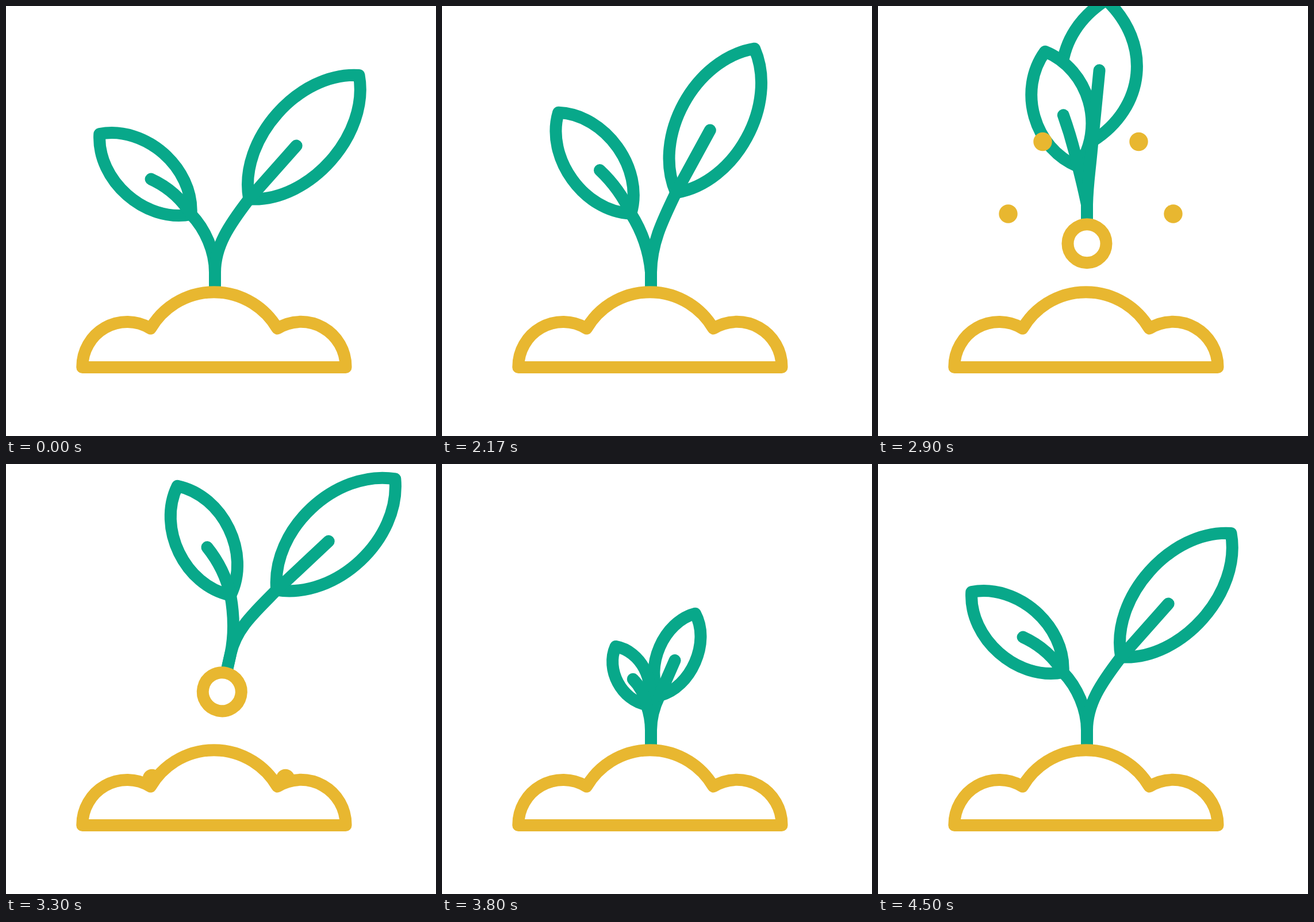
Recreate the animation shown at these times as an HTML page. Size 748 by 748 pixels, loop 4.52 s.

```html
<!DOCTYPE html>
<html lang="en">
<head>
<meta charset="utf-8">
<title>Sprout</title>
<style>
html, body { margin: 0; width: 100%; height: 100%; overflow: hidden; background: #fff; }
svg { display: block; width: 100%; height: 100%; }
.line { fill: none; stroke-width: 21; stroke-linecap: round; stroke-linejoin: round; }
.green { stroke: #08a88a; }
.gold { stroke: #e8b730; }
.white { fill: #fff; }
</style>
</head>
<body>
<svg id="stage" viewBox="0 0 748 748"></svg>
<script>
const LOOP = 4520, STEP = 25;
const AXIS = 363.5, BALL_Y = 531;
const MOUND = 'M132.8 628.5A78 78 0 0 1 251.5 561A127.7 127.7 0 0 1 472 561A78 78 0 0 1 591 628.5Z';
const stage = document.getElementById('stage');

function add(parent, tag, attrs = {}) {
  const el = document.createElementNS('http://www.w3.org/2000/svg', tag);
  set(el, attrs);
  parent.appendChild(el);
  return el;
}
function set(el, attrs) {
  for (const k in attrs) el.setAttribute(k, attrs[k]);
}
const show = (el, on) => el.setAttribute('display', on ? 'inline' : 'none');
const lerp = (a, b, k) => a + (b - a) * k;
const mix = (p, q, k) => p.map((side, i) => side.map((v, j) => lerp(v, q[i][j], k)));
const span = (t, a, b) => Math.min(1, Math.max(0, (t - a) / (b - a)));

// Ease with horizontal handles: out-handle x1, in-handle x2.
function ease(u, x1, x2) {
  if (u <= 0 || u >= 1) return u <= 0 ? 0 : 1;
  let lo = 0, hi = 1, s = 0.5;
  for (let i = 0; i < 24; i++) {
    s = (lo + hi) / 2;
    const x = 3 * x1 * s * (1 - s) ** 2 + 3 * x2 * s * s * (1 - s) + s ** 3;
    if (x < u) lo = s; else hi = s;
  }
  return s * s * (3 - 2 * s);
}

// Per side [left, right]: base x, base y, leaf angle, length, bulge, vein bow,
// stem angle, stem lean, root y
const OPEN = [
  [322, 362.5, -48.7, 212, 48, 14, -44, 0, 496],
  [422.8, 335.8, 41.6, 288, 62, 0, 37.5, 0, 496]
];
const PULLED = [
  [340, 359, -13.4, 224, 49, 1, -12, -9, 498],
  [380, 306, 6.5, 281, 63, 0, 6, 2, 498]
];
const SQUASHED = [
  [348, 397, -16, 208, 49, 3, -14.5, -5, 498],
  [373, 353, 5.6, 247, 65, 0, 5, 1, 498]
];
const SWAYING = [
  [340, 359, -42, 212, 48, 12, -24, 0, 498],
  [424, 335, 38.5, 288, 62, 0, 36, 0, 498]
];
const VEIN = [93, 124], REACH = [36, 58];

function makePlant(parent) {
  const g = add(parent, 'g');
  const line = cls => add(g, 'path', { class: 'line green ' + cls });
  const right = line('white'), left = line('white');
  return {
    g,
    leaves: [left, right],
    stems: [line(''), line('')],
    veins: [line(''), line('')]
  };
}

// size trims the stems and scales the leaves; fold turns the leaves upright.
function drawPlant(plant, pose, size = 1, fold = 0) {
  pose.forEach(([bx, by, angle, len, bulge, bow, aim, lean, root], i) => {
    const a = aim * Math.PI / 180;
    const stem = plant.stems[i];
    const cx = bx - Math.sin(a) * REACH[i], cy = by + Math.cos(a) * REACH[i];
    set(stem, {
      d: `M${AXIS} ${root}V463C${AXIS + lean} ${463 - 0.355 * (463 - by)} ${cx} ${cy} ${bx} ${by}`
    });
    let x = bx, y = by;
    if (size < 1) {
      const cut = stem.getTotalLength() * size;
      const p = stem.getPointAtLength(cut);
      x = p.x;
      y = p.y;
      set(stem, { 'stroke-dasharray': cut + ' 999' });
    } else {
      stem.removeAttribute('stroke-dasharray');
    }
    const turn = (angle + (i ? -fold : 1.15 * fold)) * Math.PI / 180;
    const at = (u, v) => {
      const px = u * size, py = v * size;
      return (x + px * Math.cos(turn) + py * Math.sin(turn)) + ' ' +
             (y + px * Math.sin(turn) - py * Math.cos(turn)) + ' ';
    };
    const w = bulge * 4 / 3, h = bulge * 1.04;
    set(plant.leaves[i], {
      d: 'M' + at(0, 0) + 'C' + at(w, h) + at(w, len - h) + at(0, len) +
         'C' + at(-w, len - h) + at(-w, h) + at(0, 0) + 'Z'
    });
    set(plant.veins[i], { d: 'M' + at(0, 0) + 'Q' + at(bow, VEIN[i] / 2) + at(0, VEIN[i]) });
  });
}

const flying = makePlant(stage);
add(flying.g, 'circle', { class: 'line gold white', cx: AXIS, cy: BALL_Y, r: 33.5 });
const crumbs = [-1, 1, -1, 1].map(() => add(stage, 'circle', { r: 16.2, fill: '#e8b730' }));
add(stage, 'path', { d: MOUND, class: 'white' });
const rooted = makePlant(stage);
add(stage, 'path', { d: MOUND, class: 'line gold' });

const pull = t => ease(span(t, 1995, 2560), 0.167, 0.67);
const pulledPose = t => mix(OPEN, PULLED, pull(t) / pull(2450));

function drawFlight(t) {
  const squash = ease(span(t, 2540, 2890), 0.3, 0.5);
  const spread = ease(span(t, 2920, 3460), 0.33, 0.5);
  const tilt = 15.5 * ease(span(t, 2920, 3500), 0.33, 0.5);
  const lift = 120 * ease(span(t, 2525, 2960), 0.167, 0.4) + 471 * span(t, 3000, 3760) ** 3.73;
  const pose = spread > 0
    ? mix(SQUASHED, SWAYING, spread)
    : mix(pulledPose(2550), SQUASHED, squash);
  drawPlant(flying, pose);
  set(flying.g, {
    transform: `translate(${AXIS + tilt * 0.97} ${BALL_Y - lift}) rotate(${tilt}) translate(${-AXIS} ${-BALL_Y})`
  });
}

function drawCrumbs(t) {
  const d = t - 2550;
  const outer = [108 + 0.0489 * d + 0.00015 * d * d, 361.5 + 229 * ((t - 2900) / 350) ** 2];
  const inner = [55 + 0.0814 * d, 234 + 330 * ((t - 2930) / 380) ** 2];
  crumbs.forEach((c, i) => {
    const [off, y] = i < 2 ? outer : inner;
    show(c, d >= 0 && y < 592);
    set(c, { cx: 370 + (i % 2 ? off : -off), cy: y });
  });
}

function drawGrowth(t) {
  const e = ease(span(t, 3490, 4500), 0.167, 0.3);
  drawPlant(rooted, OPEN, 0.06 * Math.min(1, e / 0.03) + 0.94 * e, 37 * (1 - e));
}

function render(ms) {
  const t = STEP * Math.floor((ms + 5) / STEP);
  const aloft = t >= 2550 && t < 3800;
  show(flying.g, aloft);
  show(rooted.g, t < 2550 || t > 3490);
  if (aloft) drawFlight(t);
  drawCrumbs(t);
  if (t < 2550) drawPlant(rooted, pulledPose(t));
  else if (t > 3490) drawGrowth(t);
}

const start = performance.now();
function tick() {
  render((performance.now() - start) % LOOP);
  requestAnimationFrame(tick);
}
tick();
</script>
</body>
</html>
```
